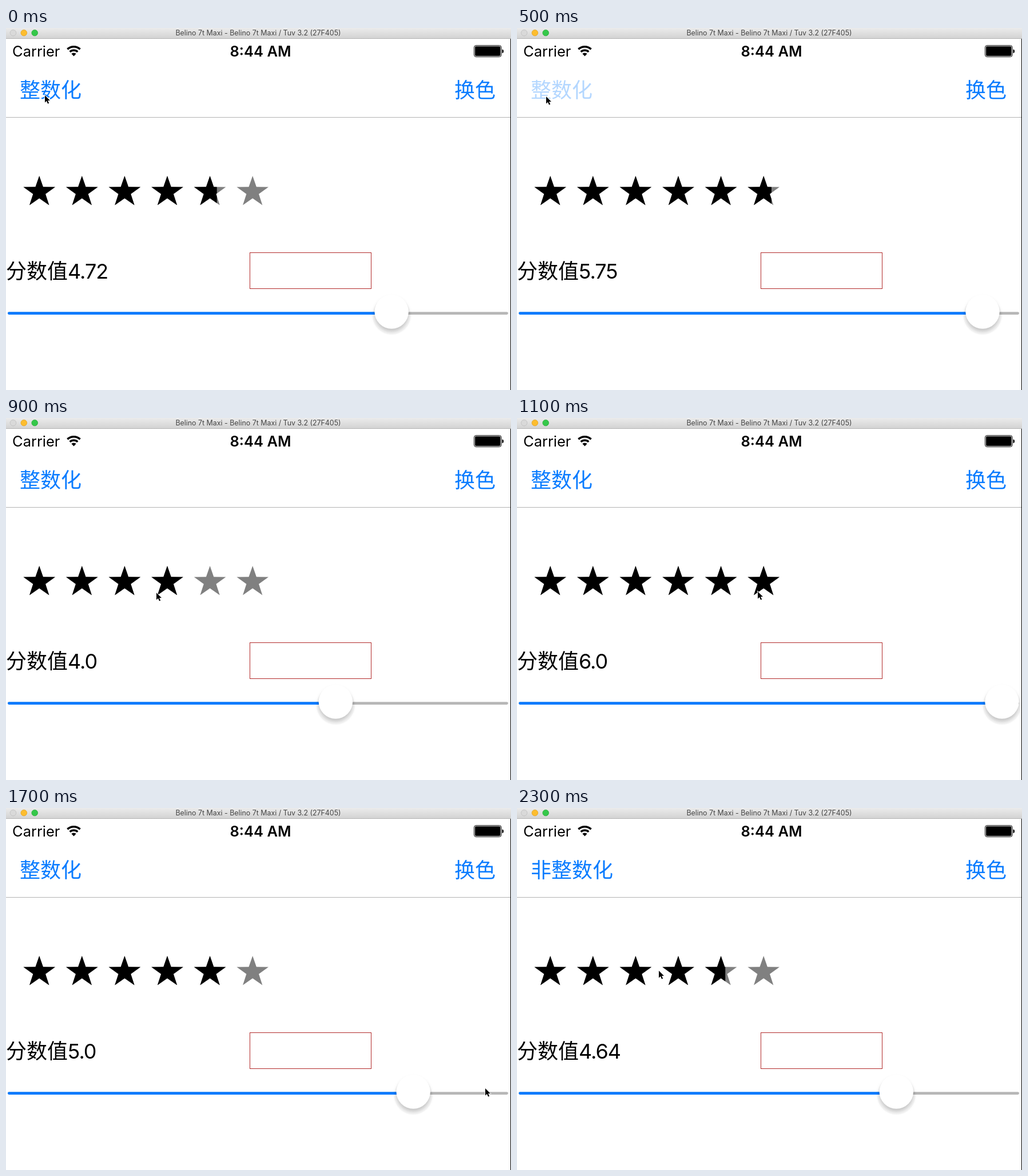
An HTML page for the animation above (2.4 s loop, 883 px wide and 634 px high).

```html
<!DOCTYPE html>
<html lang="zh">
<head>
<meta charset="utf-8">
<title>Star rating</title>
<style>
html, body { margin: 0; width: 100%; height: 100%; overflow: hidden; background: #fff; }
svg { display: block; width: 883px; height: 634px; }
text { font-family: Inter, Roboto, sans-serif; }
.zh { font: 350 36px "Noto Sans CJK SC", "Noto Sans CJK", sans-serif; }
.link { fill: #0a7cff; }
#thumb { filter: drop-shadow(0 5px 3px #0003); }
</style>
</head>
<body>
<svg viewBox="0 0 883 634">
  <defs>
    <linearGradient id="bar" x2="0" y2="1">
      <stop stop-color="#ebebeb"/><stop offset="1" stop-color="#d3d3d3"/>
    </linearGradient>
    <clipPath id="score"><rect id="filled" y="250" height="70"/></clipPath>
  </defs>

  <!-- window title -->
  <rect width="883" height="18" fill="url(#bar)"/>
  <rect y="18" width="883" height="1" fill="#b4b4b4"/>
  <circle cx="12.5" cy="8.5" r="5.3" fill="#d9d9d9" stroke="#bdbdbd" stroke-width=".8"/>
  <circle cx="31.3" cy="8.5" r="5.3" fill="#fdbd2e" stroke="#dfa023" stroke-width=".8"/>
  <circle cx="50.2" cy="8.5" r="5.3" fill="#35c84a" stroke="#27aa35" stroke-width=".8"/>
  <text x="441" y="13" font-size="12.4" fill="#444" text-anchor="middle">Belino 7t Maxi - Belino 7t Maxi / Tuv 3.2 (27F405)</text>

  <!-- status bar -->
  <text x="11" y="50" font-size="25.5">Carrier</text>
  <g fill="none" stroke="#000" stroke-width="3.5">
    <path d="M107.4 37.1A16.3 16.3 0 0 1 129.6 37.1M111.7 41.7A10 10 0 0 1 125.3 41.7"/>
    <path d="M118.5 49.5l-4.2-4.4a6 6 0 0 1 8.4 0z" fill="#000" stroke="none"/>
  </g>
  <text x="445" y="50" font-size="25.5" font-weight="600" text-anchor="middle">8:44 AM</text>
  <rect x="818.5" y="30.5" width="47.5" height="20" rx="3.5" fill="none" stroke="#000"/>
  <rect x="820" y="32" width="44.5" height="17" rx="2"/>
  <path d="M867.5 37.5q2.5 0 2.5 3.3t-2.5 3.3z"/>

  <!-- navigation -->
  <text id="mode" class="zh link" x="24" y="122"></text>
  <text class="zh link" x="784" y="122">换色</text>
  <rect y="156" width="883" height="1" fill="#b2b2b2"/>

  <path class="stars" fill="#808080"/>
  <path class="stars" clip-path="url(#score)"/>

  <text class="zh" x="0" y="439">分数值</text>
  <text id="value" x="108" y="439" font-size="36" letter-spacing="-1"></text>
  <rect x="426.5" y="393.5" width="212" height="63" fill="none" stroke="#b22a2a"/>

  <!-- slider -->
  <rect x="3" y="497.3" width="875" height="4.6" rx="2.3" fill="#b7b7b7"/>
  <rect id="track" x="3" y="497.3" height="4.6" rx="2.3" fill="#087bff"/>
  <g id="knob">
    <circle cy="503.5" r="33.5" opacity=".03"/>
    <circle id="thumb" cy="497" r="29.7" fill="#fff"/>
  </g>

  <rect x="882" y="19" width="1" height="615"/>
  <path id="cursor" d="M1 1V13.5L4 10.8 6 15.6 8.2 14.7 6.1 10.1H10z"
    stroke="#fff" stroke-width="1.6" paint-order="stroke"/>
</svg>
<script>
const $ = id => document.getElementById(id);
const STEP = 100, GAP = 74.6, LEFT = 30, WIDTH = 56;

// [cursor x, cursor y, score], one entry per step
const poses = [
  [67, 117, 4.72], [150, 190, 4.72], [250, 265, 4.72], [334, 309, 4.72],
  [818, 500, 5.75], [50, 119, 5.75], [46, 118, 5.75], [102, 307, 2],
  [185, 306, 3], [262, 305, 4], [340, 304, 5], [420, 303, 6],
  [700, 430, 6], [640, 508, 4], [452, 509, 3], [330, 510, 2],
  [610, 502, 4], [837, 490, 5], [75, 118, 5], [75, 118, 5],
  [846, 500, 5.98], [663, 504, 4.64], [450, 390, 4.64], [247, 284, 4.64]
];
const PRESS = 5, FREE = 19; // button held down; whole-number mode ends

function star(cx) {
  const points = Array.from({ length: 10 }, (_, k) => {
    const a = k * Math.PI / 5, r = k % 2 ? 0.39 : 1;
    return [cx + 29.2 * r * Math.sin(a), 287.3 - 28.3 * r * Math.cos(a)].map(n => n.toFixed(2));
  });
  return "M" + points.join("L") + "Z";
}
const stars = Array.from({ length: 6 }, (_, i) => star(58.2 + GAP * i)).join("");
document.querySelectorAll(".stars").forEach(p => p.setAttribute("d", stars));

function draw(now) {
  const i = Math.floor(now / STEP) % poses.length;
  const [x, y, score] = poses[i];
  const whole = Math.floor(score);
  const knobX = 33.2 + 135.8 * score;
  $("filled").setAttribute("width", LEFT + GAP * whole + WIDTH * (score - whole));
  $("value").textContent = score === whole ? score.toFixed(1) : score.toFixed(2);
  $("mode").textContent = i < FREE ? "整数化" : "非整数化";
  $("mode").setAttribute("opacity", i === PRESS ? 0.3 : 1);
  $("track").setAttribute("width", knobX - 3);
  $("knob").setAttribute("transform", `translate(${knobX} 0)`);
  $("cursor").setAttribute("transform", `translate(${x} ${y})`);
}

const start = performance.now();
function tick() {
  draw(performance.now() - start);
  requestAnimationFrame(tick);
}
tick();
</script>
</body>
</html>
```
